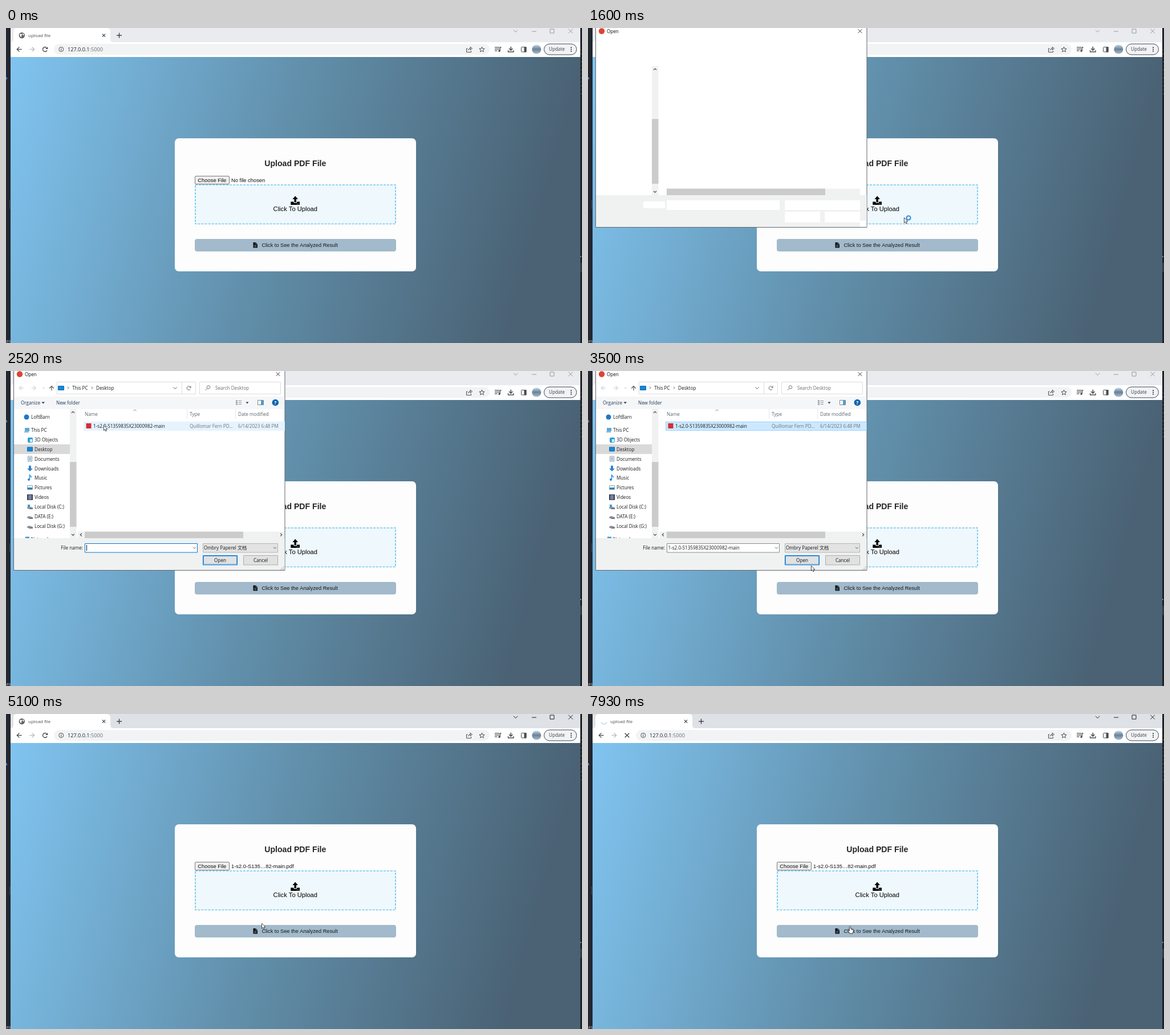
These frames come from a looping animation (1010 px wide and 554 px high, 7.99 s). An HTML page with a canvas:

```html
<!DOCTYPE html>
<html lang="en">
<head>
<meta charset="utf-8">
<title>upload file</title>
<style>
html, body { margin: 0; width: 100%; height: 100%; overflow: hidden; background: #23272f; }
canvas { display: block; }
</style>
</head>
<body>
<canvas id="stage" width="1010" height="554"></canvas>
<script>
const ctx = document.getElementById('stage').getContext('2d');
const LOOP = 7990, STEP = 66.5;
const UI = '"Open Sans", "Noto Sans", sans-serif';
const PAGE = '"Liberation Sans", Arial, sans-serif';
const FILE = '1-s2.0-S1359835X23000982-main';

// Moments at which the interface changes state
const CLICK = 1320, BUSY = 1390, DIALOG = 1530, FILLED = 1670, HOVER = 2400,
      SELECT = 2600, CLOSE = 3830, CHOSEN = 4020, SUBMIT = 5280;

// Pointer path: time, x, y
const PATH = [
  [400, 854, 504], [458, 729, 445], [797, 729, 445], [1064, 554, 333],
  [1670, 554, 333], [2060, 280, 180], [2128, 280, 180], [2450, 171, 95],
  [2640, 171, 95], [2920, 474, 338], [3060, 468, 346], [3390, 391, 342],
  [3590, 391, 342], [3710, 389, 335], [4780, 389, 335], [5100, 458, 373],
  [5260, 458, 373], [5330, 460, 373]
];

function rect(x, y, w, h, fill, stroke, radius = 0) {
  ctx.beginPath();
  const inset = stroke ? 0.5 : 0;
  ctx.roundRect(x + inset, y + inset, w - 2 * inset, h - 2 * inset, radius);
  paint(fill, stroke, 1);
}

function circle(x, y, r, fill, stroke, width = 1) {
  ctx.beginPath();
  ctx.arc(x, y, r, 0, 2 * Math.PI);
  paint(fill, stroke, width);
}

function paint(fill, stroke, width) {
  if (fill) { ctx.fillStyle = fill; ctx.fill(); }
  if (stroke) { ctx.strokeStyle = stroke; ctx.lineWidth = width; ctx.stroke(); }
}

function line(points, color, width = 1) {
  ctx.beginPath();
  for (let i = 0; i < points.length; i += 2) ctx.lineTo(points[i], points[i + 1]);
  paint(null, color, width);
}

function poly(points, fill, stroke, width = 1) {
  ctx.beginPath();
  for (let i = 0; i < points.length; i += 2) ctx.lineTo(points[i], points[i + 1]);
  ctx.closePath();
  paint(fill, stroke, width);
}

function arc(x, y, r, from, to, color, width) {
  ctx.beginPath();
  ctx.arc(x, y, r, from, to);
  paint(null, color, width);
}

function text(str, x, y, color = '#1b1b1b', size = 8.15, family = UI, align = 'left', weight = '') {
  ctx.font = `${weight} ${size}px ${family}`;
  ctx.textAlign = align;
  ctx.fillStyle = color;
  ctx.fillText(str, x, y);
}

function cross(x, y, r, color, width = 1) {
  line([x - r, y - r, x + r, y + r], color, width);
  line([x - r, y + r, x + r, y - r], color, width);
}

// dir: 0 right, 1 down, 2 left, 3 up
function chevron(x, y, r, dir, color, width = 1) {
  ctx.save();
  ctx.translate(x, y);
  ctx.rotate(dir * Math.PI / 2);
  line([-r / 2, -r, r / 2, 0, -r / 2, r], color, width);
  ctx.restore();
}

function arrow(x, y, r, dir, color, width = 1.2) {
  ctx.save();
  ctx.translate(x, y);
  ctx.rotate(dir * Math.PI / 2);
  line([-r, 0, r, 0], color, width);
  line([0, -r, r, 0, 0, r], color, width);
  ctx.restore();
}

function reloadIcon(x, y, r, color, width) {
  arc(x, y, r, 0.5, 5.4, color, width);
  poly([x + r + 0.7, y - r - 0.5, x + r + 0.7, y - 0.4, x + 0.6, y - 0.4], color);
}

function desktopEdges() {
  rect(0, 0, 1010, 554, '#23272f');
  circle(0, 88.5, 2.2, '#3d86cf');
  rect(6, 303, 1, 15, '#4a505a');
  text('as', 0, 553, '#b9bec6', 8, UI);
  rect(1007, 0, 3, 554, '#1e2229');
  for (let y = 38; y < 116; y += 7) rect(1008, y, 2, 1, y % 2 ? '#5c6470' : '#3c434d');
  rect(1007, 401, 1.5, 1.5, '#c6cad0');
  rect(1007, 413, 3, 16, '#343a43');
}

function tabStrip(active, spin) {
  rect(8, 0, 999, 25, active ? '#dee1e6' : '#e9ebee');
  ctx.beginPath();
  ctx.moveTo(8, 25);
  ctx.quadraticCurveTo(13, 25, 13, 19);
  ctx.lineTo(13, 6);
  ctx.quadraticCurveTo(13, 0, 19, 0);
  ctx.lineTo(177, 0);
  ctx.quadraticCurveTo(183, 0, 183, 6);
  ctx.lineTo(183, 19);
  ctx.quadraticCurveTo(183, 25, 188, 25);
  paint('#fff');
  if (spin === null) {
    circle(27.8, 13, 5.2, '#5f6368');
    poly([24, 11, 27, 10, 28.5, 12, 26.5, 13.5, 27.5, 16.5, 25, 15], '#fff');
    poly([29, 9, 31.5, 11, 31, 13.5, 29.5, 12.5], '#fff');
  } else {
    arc(28, 13, 5, spin - 1.3, spin + 1.3, '#b1c9f1', 1.2);
  }
  text('upload file', 39, 16, '#4a4d51', 8);
  cross(171.5, 13, 2.6, '#3c4043', 1.2);
  line([194, 13, 203, 13], '#3c4043', 1.4);
  line([198.5, 8.5, 198.5, 17.5], '#3c4043', 1.4);

  const ctl = active ? '#202124' : '#96999d';
  chevron(893.5, 5.5, 3.6, 1, ctl);
  line([922, 6, 930, 6], ctl);
  rect(953.5, 1.5, 8, 8, null, ctl);
  cross(990, 5.5, 3.8, ctl);
}

function toolbar(loading) {
  rect(8, 25, 999, 26, '#fff');
  arrow(23.5, 37.5, 4.2, 2, '#3c4043');
  arrow(45.5, 37.5, 4.2, 0, '#b4b7ba');
  if (loading) cross(68.5, 37.5, 3.8, '#3c4043', 1.3);
  else reloadIcon(68.5, 37.5, 4, '#3c4043', 1.3);

  rect(84, 28, 764, 19, '#f1f3f4', null, 9.5);
  circle(96.8, 37.5, 4, null, '#4a4d51');
  line([96.8, 36.8, 96.8, 39.8], '#4a4d51', 1.1);
  rect(96.3, 35, 1.1, 1.1, '#4a4d51');
  text('127.0.0.1', 108, 41, '#202124', 9.15);
  text(':5000', 108 + ctx.measureText('127.0.0.1').width, 41, '#6a6e73', 9.15);

  const ink = '#4a4d51';
  line([809.5, 36, 807.5, 36, 807.5, 42.5, 815.5, 42.5, 815.5, 40], ink);
  ctx.beginPath();
  ctx.moveTo(810, 39.5);
  ctx.quadraticCurveTo(810.5, 36, 815, 36);
  paint(null, ink, 1);
  poly([814, 33.2, 817.5, 36, 814, 38.8], null, ink);

  const star = [];
  for (let i = 0; i < 10; i++) {
    const r = i % 2 ? 2.1 : 4.9, a = (i * 36 - 90) * Math.PI / 180;
    star.push(834.5 + r * Math.cos(a), 38 + r * Math.sin(a));
  }
  poly(star, null, ink);

  for (let i = 0; i < 3; i++) line([857, 34 + 3 * i, i < 2 ? 865 : 861.5, 34 + 3 * i], ink, 1.3);
  line([868.5, 34, 866.3, 34, 866.3, 40], ink, 1.3);
  circle(865, 40.3, 1.7, ink);

  arrow(885.3, 36, 3.2, 1, ink, 1.6);
  line([880.5, 39, 880.5, 42, 890, 42, 890, 39], ink, 1.3);
  rect(903, 33, 9.5, 9.5, null, ink, 1);
  rect(908.5, 33, 4, 9.5, ink);

  const photo = ctx.createLinearGradient(0, 30, 0, 46);
  photo.addColorStop(0, '#b9d3e6');
  photo.addColorStop(0.45, '#6c8195');
  photo.addColorStop(1, '#a9c3d6');
  circle(930.3, 37.5, 8, photo);

  rect(943, 27.5, 58, 20, '#f1f3f4', '#3a4450', 9.5);
  text('Update', 952, 40.3, '#3c4043');
  for (let i = -1; i < 2; i++) circle(991, 37.5 + 3.2 * i, 1, '#202124');
}

function page(chosen) {
  const g = ctx.createLinearGradient(8, 51, 942, 309);
  g.addColorStop(0, '#80c4f0');
  g.addColorStop(0.5, '#6291ad');
  g.addColorStop(1, '#4a6274');
  rect(8, 51, 999, 503, g);

  rect(296, 194, 423, 234, '#fdfdfd', null, 7);
  text('Upload PDF File', 507.3, 242.5, '#262626', 14.1, PAGE, 'center', 'bold');
  rect(331, 260, 61, 15, '#efefef', '#7a7a7a', 1.5);
  text('Choose File', 361.3, 270.5, '#111', 9.35, PAGE, 'center');
  text(chosen ? '1-s2.0-S135…82-main.pdf' : 'No file chosen', 395, 270.5, '#111', 9.35, PAGE);

  rect(331, 275, 353, 70, '#eff8fc');
  ctx.setLineDash([4, 2]);
  ctx.beginPath();
  ctx.rect(332, 276, 351, 68.5);
  paint(null, '#74c7f0', 1.7);
  ctx.setLineDash([]);

  poly([507.2, 295.5, 512, 301, 509, 301, 509, 306.5, 505.4, 306.5, 505.4, 301, 502.4, 301], '#000');
  poly([499.3, 305.5, 504, 305.5, 505, 307.7, 509.5, 307.7, 510.5, 305.5, 515, 305.5, 515, 311, 499.3, 311], '#000');
  rect(510, 308.7, 1, 1, '#fff');
  rect(512.3, 308.7, 1, 1, '#fff');
  text('Click To Upload', 507.3, 322, '#000', 11.15, PAGE, 'center');

  rect(331, 371, 353, 22, '#a2bacb', null, 4);
  poly([433.5, 377, 438, 377, 441, 380, 441, 386.5, 433.5, 386.5], '#0c0f12');
  line([438, 377, 438, 380, 441, 380], '#a2bacb', 0.6);
  line([435, 382.3, 439.5, 382.3], '#a2bacb', 0.7);
  line([435, 384.3, 439.5, 384.3], '#a2bacb', 0.7);
  text('Click to See the Analyzed Result', 448.4, 384.7, '#15191d', 9.2, PAGE);
}

const SIDEBAR = [
  ['LoftBarn', 44, 81, (x, y) => circle(x, y, 4.5, '#1979ca')],
  ['This PC', 44, 104, (x, y) => { rect(x - 3, y - 4, 8, 6, '#5aa9dc'); rect(x - 4, y + 2.5, 8, 1.5, '#8a9299'); }],
  ['3D Objects', 50, 121, (x, y) => { rect(x - 4, y - 4, 9, 9, '#2f9fd6', null, 2); rect(x, y - 1, 4, 5, '#d4f0fa'); }],
  ['Desktop', 50, 137.5, (x, y) => rect(x - 5, y - 4, 10, 8, '#1587d8', '#0c6cb5')],
  ['Documents', 50, 154.5, (x, y) => { rect(x - 4, y - 5, 8, 10, '#f4f6f8', '#929ca6'); for (let i = -2; i < 4; i += 2) line([x - 2, y + i, x + 2, y + i], '#4a91c8'); }],
  ['Downloads', 50, 171.5, (x, y) => poly([x - 2, y - 5, x + 2, y - 5, x + 2, y, x + 5, y, x, y + 5, x - 5, y, x - 2, y], '#2f83cd')],
  ['Music', 50, 188, (x, y) => { circle(x - 2, y + 3, 2, '#1b8ad6'); line([x - 0.5, y + 3, x - 0.5, y - 5, x + 3, y - 1], '#1b8ad6', 1.4); }],
  ['Pictures', 50, 205, (x, y) => { rect(x - 5, y - 4, 10, 8, '#eef6fb', '#8fa3b0'); rect(x - 4, y, 8, 3, '#2e84b8'); }],
  ['Videos', 50, 222, (x, y) => { rect(x - 5, y - 5, 10, 10, '#3a3f48'); rect(x - 3, y - 4, 6, 8, '#7180a8'); }],
  ['Local Disk (C:)', 50, 239, (x, y) => { drive(x, y); rect(x - 4, y - 4, 4, 4, '#27a0dc'); }],
  ['DATA (E:)', 50, 256, drive],
  ['Local Disk (G:)', 50, 273, drive],
  ['Network', 44, 295.5, (x, y) => { rect(x - 2, y - 4, 7, 6, '#3f9ad6'); circle(x - 3, y + 1, 2.5, '#63b5e4'); }]
];

function drive(x, y) {
  poly([x - 5, y + 1, x - 2, y - 1, x + 5, y + 1, x + 5, y + 4, x - 1, y + 4, x - 5, y + 2.5], '#8b9299');
  line([x - 1, y + 3.3, x + 5, y + 3.3], '#4d5359');
}

function scrollbars(full) {
  rect(112, 67, 11.5, 227, '#f0f1f1');
  rect(112, 160, 11.5, 114, '#cbcbcb');
  chevron(117.5, 72.5, 2.5, 3, '#505050', 1.2);
  chevron(117.5, 288, 2.5, 1, '#505050', 1.2);
  rect(full ? 126 : 138, 282.5, full ? 362 : 339, 11.5, '#f0f1f1');
  rect(138, 282.5, 278, 11.5, '#cbcbcb');
  if (!full) return;
  chevron(131.5, 288, 2.5, 2, '#505050', 1.2);
  chevron(482.5, 288, 2.5, 0, '#505050', 1.2);
}

function dialogHeader() {
  arrow(27, 30, 3.7, 2, '#d2d2d2');
  arrow(48.5, 30, 3.7, 0, '#d2d2d2');
  chevron(66, 30, 1.8, 1, '#c2c2c2');
  arrow(80, 30.5, 3.8, 3, '#555');
  rect(89, 19, 244, 22, '#fff', '#dcdcdc');
  line([308.5, 19, 308.5, 41], '#dcdcdc');
  rect(91, 26, 11, 8, '#1587d8', '#0c6cb5');
  chevron(109, 29.5, 2, 0, '#555');
  text('This PC', 116, 32.7);
  chevron(151, 29.5, 2, 0, '#555');
  text('Desktop', 158, 32.7);
  chevron(296.5, 30, 3, 1, '#555');
  reloadIcon(320.5, 30, 3.3, '#666', 1);
  rect(339, 19, 143, 22, '#fff', '#dcdcdc');
  circle(355, 28.5, 2.8, null, '#777');
  line([353, 30.5, 349.5, 34], '#777');
  text('Search Desktop', 367, 32.8, '#6d6d6d');

  rect(14, 45, 474, 22, '#f5f6f7');
  text('Organize', 26, 58.8, '#1e395b');
  poly([62.5, 54.5, 68, 54.5, 65.2, 57.5], '#1e395b');
  text('New folder', 88, 58.8, '#1e395b');
  for (let i = 0; i < 3; i++) {
    rect(403, 51.5 + 3 * i, 3, 2, '#8b939c');
    line([407.5, 52.5 + 3 * i, 413, 52.5 + 3 * i], '#8b939c');
  }
  poly([420.5, 54.5, 425.5, 54.5, 423, 57.5], '#1e395b');
  rect(441, 51, 11, 9, '#fff', '#7b858f');
  rect(447, 52, 4, 7, '#4aa0dc');
  circle(472.3, 55.5, 5.8, '#0c64b0');
  text('?', 472.3, 58.6, '#fff', 8.5, UI, 'center', 'bold');
}

function fileList(hover, selected) {
  chevron(226, 69, 2.5, 3, '#888');
  text('Name', 138, 78.8, '#5d6570');
  text('Type', 322, 78.8, '#5d6570');
  text('Date modified', 407, 78.8, '#5d6570');
  line([317.5, 67, 317.5, 84], '#e5e5e5');
  line([402.5, 67, 402.5, 84], '#e5e5e5');
  if (selected) rect(136, 89, 353, 16, '#cce8ff', '#99d1ff');
  else if (hover) rect(136, 89, 353, 16, '#e5f3ff');
  rect(140.5, 92, 9, 9, '#d32f35');
  text(FILE, 153, 100.2);
  text('Quillomar Fern PD...', 322, 100.2, '#727272', 8.1);
  text('6/14/2023 6:48 PM', 407, 100.2, '#727272', 8.1);
}

function pushButton(label, x, isDefault, pointer) {
  const over = pointer.x >= x && pointer.x < x + 61 && pointer.y >= 324 && pointer.y < 341;
  rect(x, 324, 61, 17.5, over ? '#e5f1fb' : '#e1e1e1', isDefault || over ? '#0078d7' : '#adadad');
  if (isDefault) rect(x + 1, 325, 59, 15.5, null, '#4fa0e0');
  text(label, x + 30.5, 335.8, '#111', 8.15, UI, 'center');
}

function dialogFooter(selected, pointer, t) {
  text('File name:', 135, 314, '#1b1b1b', 8.15, UI, 'right');
  rect(138, 303, 198, 16.5, '#fff', selected ? '#8a8a8a' : '#0078d7');
  if (selected) text(FILE, 140.5, 314, '#1b1b1b', 8.1);
  else if (t % 1060 < 640) line([141.5, 306, 141.5, 316], '#111');
  chevron(330.5, 311, 2.5, 1, '#666');
  rect(345, 303, 132, 16.5, '#e3e3e3', '#b4b4b4');
  text('Ombry Paperel 文档', 347, 314, '#1b1b1b', 8.1, '"Open Sans", "Noto Sans CJK SC", "Noto Sans CJK", sans-serif');
  chevron(471.5, 311, 2.5, 1, '#555');
  pushButton('Open', 345, true, pointer);
  pushButton('Cancel', 416, false, pointer);
  for (let i = 0; i < 3; i++)
    for (let j = 0; j <= i; j++) rect(486 - 2.4 * j, 343.5 + 2.4 * i, 1.3, 1.3, '#a8a8a8');
}

function dialog(t, pointer) {
  const full = t >= FILLED, selected = t >= SELECT;
  rect(13, -2, 476.5, 353, '#fff', '#60666c');
  circle(24, 5.5, 5.2, '#db4437');
  text('Open', 33, 8.8, '#111');
  cross(477, 5.5, 3.3, '#333');
  rect(14, 294, 474.5, 56, '#f0f1f1');
  if (!full) {
    scrollbars(false);
    for (const [x, y, w, h] of [[97, 305, 38, 12], [138, 303, 198, 17], [345, 303, 132, 17],
      [345, 323, 62, 19], [415, 323, 62, 19], [477, 339, 11, 11]]) rect(x, y, w, h, '#fff');
    return;
  }
  dialogHeader();
  ctx.save();
  ctx.beginPath();
  ctx.rect(14, 67, 98, 227);
  ctx.clip();
  rect(14, 129, 98, 17, '#d9d9d9');
  for (const [label, x, y, icon] of SIDEBAR) {
    icon(x - 8, y);
    text(label, x, y + 3, '#1b1b1b');
  }
  ctx.restore();
  scrollbars(true);
  fileList(t >= HOVER, selected);
  dialogFooter(selected, pointer, t);
}

function pointerAt(t) {
  const q = Math.floor(t / STEP + 0.05) * STEP;
  let i = 0;
  while (i < PATH.length - 1 && PATH[i + 1][0] <= q) i++;
  const a = PATH[i], b = PATH[i + 1] || a;
  const k = b === a ? 0 : Math.min(1, Math.max(0, (q - a[0]) / (b[0] - a[0])));
  return { x: a[1] + (b[1] - a[1]) * k, y: a[2] + (b[2] - a[2]) * k };
}

function drawPointer(t, { x, y }) {
  const overPage = t < BUSY || t >= CHOSEN;
  const inZone = x > 331 && x < 684 && ((y > 275 && y < 345) || (y > 371 && y < 393));
  ctx.save();
  ctx.translate(x, y);
  if (overPage && inZone) {
    ctx.beginPath();
    ctx.moveTo(-1.6, 7.5);
    ctx.lineTo(-1.6, 1.2);
    ctx.quadraticCurveTo(-0.4, -0.4, 0.8, 1.2);
    ctx.lineTo(0.8, 4.8);
    ctx.lineTo(4.2, 5.4);
    ctx.quadraticCurveTo(5.8, 5.8, 5.6, 7.5);
    ctx.lineTo(4.3, 13);
    ctx.lineTo(-1, 13);
    ctx.lineTo(-4, 8.4);
    ctx.quadraticCurveTo(-3.8, 6.4, -1.6, 8.4);
    ctx.closePath();
    paint('#fff', '#222', 0.9);
    line([2.4, 5.2, 2.4, 7.4], '#222', 0.6);
    line([4, 5.6, 4, 7.6], '#222', 0.6);
  } else {
    poly([0.4, 0.5, 0.4, 9.6, 2.4, 7.8, 3.8, 10.9, 5.3, 10.2, 4, 7.2, 6.8, 7], '#fff', '#222', 0.8);
    if (t >= BUSY && t < FILLED) circle(8, 1, 3.6, '#d6ecfb', '#2f86e0', 1.9);
  }
  ctx.restore();
}

function draw(t) {
  const open = t >= DIALOG && t < CLOSE;
  const loading = t >= SUBMIT;
  const spin = loading ? Math.PI * 1.25 - (t - 6190) / 1265 * 2 * Math.PI : null;
  const pointer = pointerAt(t);
  desktopEdges();
  tabStrip(t >= CLICK && !open, spin);
  toolbar(loading);
  page(t >= CHOSEN);
  if (open) dialog(t, pointer);
  if (t >= 400) drawPointer(t, pointer);
}

function tick(now) {
  draw(now % LOOP);
  requestAnimationFrame(tick);
}
requestAnimationFrame(tick);
</script>
</body>
</html>
```
